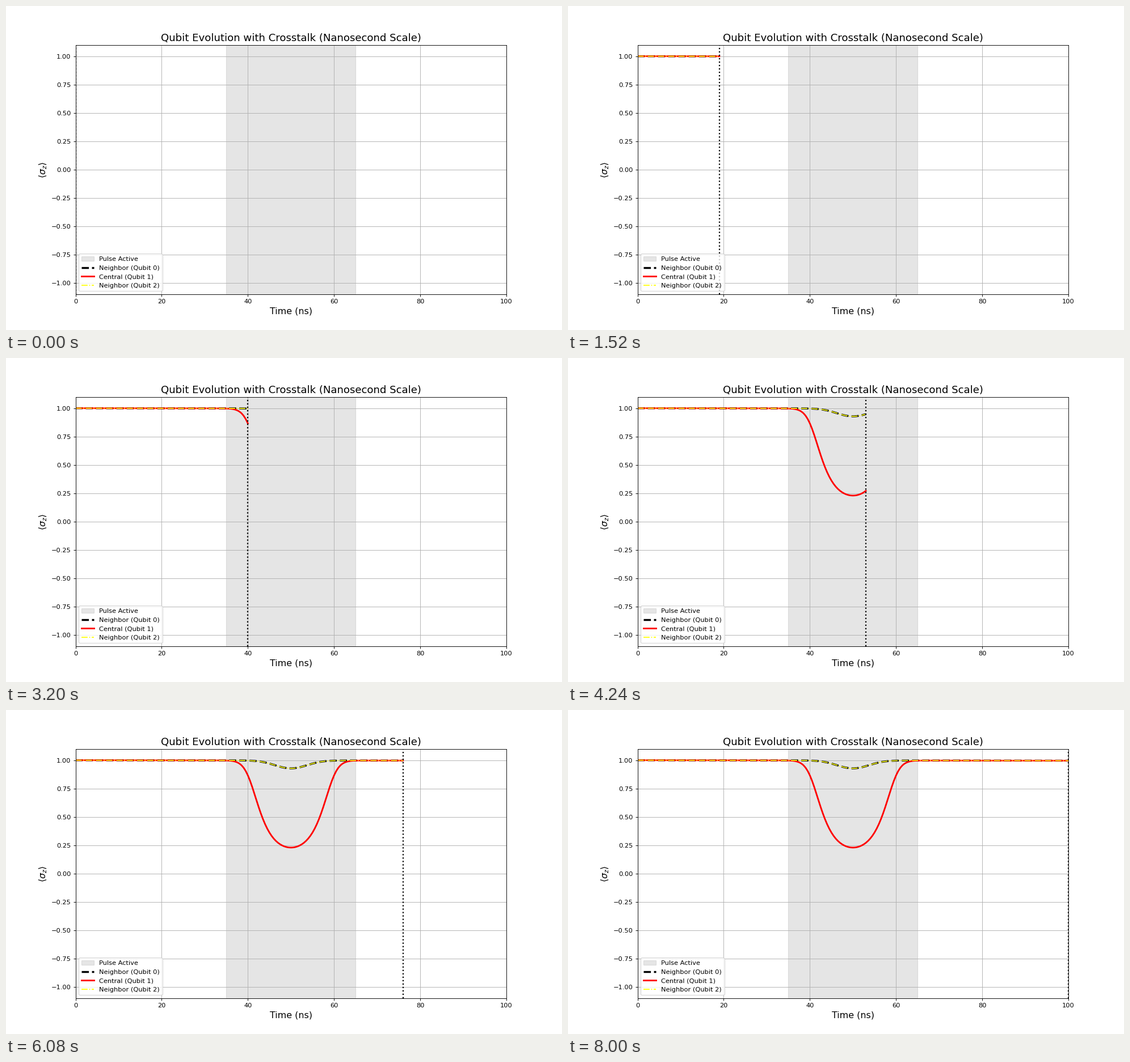
A matplotlib script that plays this animation: 980x572 px, repeating every 8040 ms.

```python
import numpy as np
import matplotlib.pyplot as plt
from matplotlib.animation import FuncAnimation

W, H = 980, 572
DPI = W / 12
FRAMES = 201
INTERVAL = 40

plt.rcParams["font.family"] = "DejaVu Sans"

t = np.linspace(0, 100, FRAMES)
pulse = np.exp(-((t - 50) ** 2) / (2 * 5**2))
decay = 1 - 4e-5 * t


def sigma_z(drive):
    """Dressed-state polarisation for a peak drive/detuning ratio."""
    return decay / np.sqrt(1 + (drive * pulse) ** 2)


central = sigma_z(4.231)
neighbor = sigma_z(0.395)

# the small margin keeps the pixel size from rounding down
fig, ax = plt.subplots(figsize=((W + 0.01) / DPI, (H + 0.01) / DPI), dpi=DPI)
ax.set_xlim(0, 100)
ax.set_ylim(-1.1, 1.1)
ax.set_title("Qubit Evolution with Crosstalk (Nanosecond Scale)", fontsize=16)
ax.set_xlabel("Time (ns)", fontsize=14)
ax.set_ylabel(r"$\langle \sigma_z \rangle$", fontsize=14)
ax.grid(True)
ax.axvspan(35, 65, color="gray", alpha=0.2, label="Pulse Active")

curves = [
    (ax.plot([], [], color=color, ls=ls, lw=lw, label=label)[0], data)
    for data, color, ls, lw, label in [
        (neighbor, "black", "--", 3, "Neighbor (Qubit 0)"),
        (central, "red", "-", 2.5, "Central (Qubit 1)"),
        (neighbor, "yellow", "-.", 1.5, "Neighbor (Qubit 2)"),
    ]
]
cursor = ax.axvline(0, color="black", ls=":", lw=2)
ax.legend(loc="lower left", fontsize=10)


def update(i):
    for line, data in curves:
        line.set_data(t[: i + 1], data[: i + 1])
    cursor.set_xdata([t[i], t[i]])
    return [line for line, _ in curves] + [cursor]


anim = FuncAnimation(fig, update, frames=FRAMES, interval=INTERVAL,
                     repeat=True, repeat_delay=0, blit=False)

plt.show()
```
